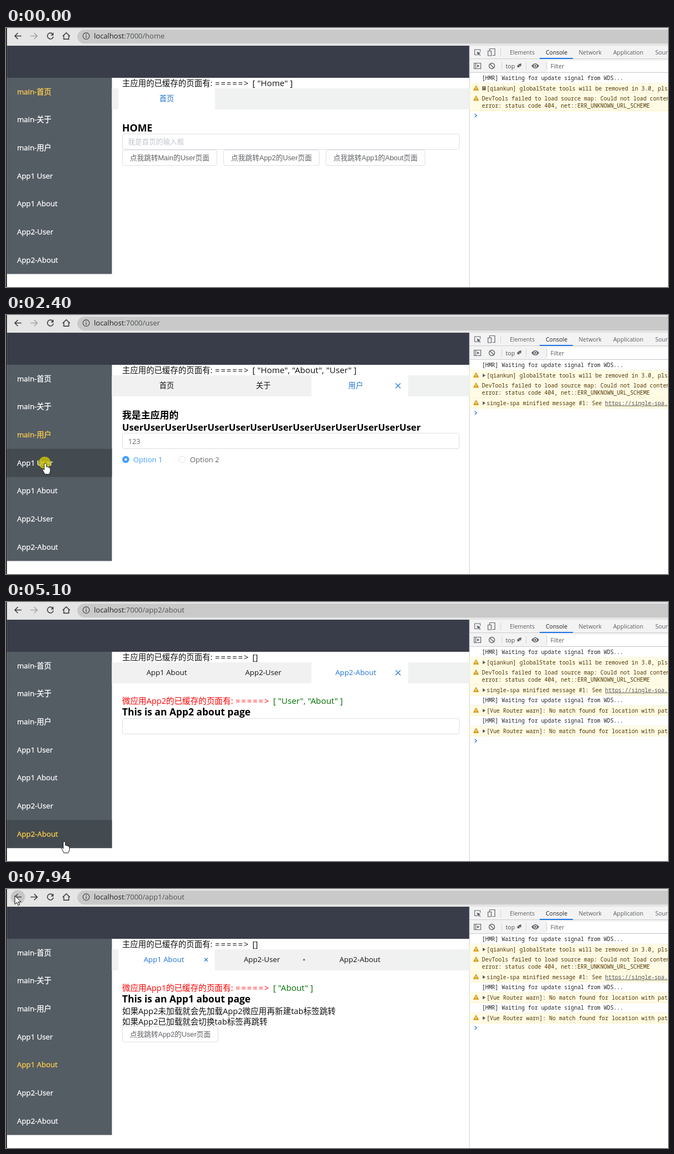
An HTML page that plays this animation: 1197x468 px, repeating every 8 s.

```html
<!DOCTYPE html>
<html lang="zh-CN">
<head>
<meta charset="utf-8">
<title>Micro app tabs</title>
<style>
html, body { margin: 0; width: 100%; height: 100%; overflow: hidden; background: #fff; }
svg { display: block; width: 1197px; height: 468px; font-family: 'Open Sans', 'Noto Sans CJK SC', 'Noto Sans CJK', sans-serif; }
.btn { font-family: 'Liberation Sans', 'Noto Sans CJK SC', 'Noto Sans CJK', sans-serif; }
.mono { font-family: 'Noto Sans Mono', monospace; }
</style>
</head>
<body>
<svg viewBox="0 0 1197 468"><g id="fixed"></g><g id="live"></g></svg>
<script>
const LOOP = 8000;
const MENU = ['main-首页', 'main-关于', 'main-用户', 'App1 User', 'App1 About', 'App2-User', 'App2-About'];
const BLUE = '#1c73d0';

// t: switch time, on: open page, show: when its content appears
const STATES = [
  { t: 0, url: 'home', on: 0, tabs: [0], list: ['Home'], show: -500 },
  { t: 1230, url: 'about', on: 1, tabs: [0, 1], list: ['Home', 'About'], show: 1380 },
  { t: 1880, url: 'user', on: 2, tabs: [0, 1, 2], list: ['Home', 'About', 'User'], show: 1930 },
  { t: 2650, url: 'app1/user', on: 3, tabs: [1, 2, 3], list: ['About', 'User'], app: 1, cache: ['User'], boot: 2760, show: 2980 },
  { t: 3370, url: 'app1/about', on: 4, tabs: [2, 3, 4], list: ['User'], app: 1, cache: ['User', 'About'], show: 3520 },
  { t: 3780, url: 'app2/user', on: 5, tabs: [3, 4, 5], list: [], app: 2, cache: ['User'], boot: 4150, show: 4560 },
  { t: 4870, url: 'app2/about', on: 6, tabs: [4, 5, 6], list: [], app: 2, cache: ['User', 'About'], show: 4940 },
  { t: 7100, url: 'app2/user', on: 5, tabs: [4, 5, 6], list: [], app: 2, cache: ['User', 'About'], show: 7180 },
  { t: 7740, url: 'app1/about', on: 4, tabs: [4, 5, 6], list: [], app: 1, cache: ['About'], show: 7740 }
];

// pointer path: time, x, y
const PATH = [
  [70, 1097, 460], [180, 1097, 460], [240, 800, 372], [320, 380, 250], [400, 22, 162], [540, 28, 158],
  [700, 35, 155], [1300, 35, 155], [1650, 48, 208], [1960, 50, 212], [2150, 70, 267], [2570, 70, 267],
  [2850, 74, 310], [3120, 75, 322], [3300, 76, 348], [3390, 77, 356], [3460, 77, 373], [3850, 77, 373],
  [4410, 85, 386], [4480, 105, 438], [4870, 105, 437], [5230, 104, 430], [5620, 686, 290],
  [6030, 53, 144], [6380, 30, 17], [6540, 30, 17], [6720, 16, 12]
];
const CLICKS = [[1010, 1130], [1720, 1860], [2400, 2570], [3130, 3230], [3620, 3740], [4720, 4860], [6870, 7020], [7710, 7800]];
const LOGS = [
  { t: 0, text: ['[HMR] Waiting for update signal from WDS...'] },
  { t: 0, warn: 1, more: 1, text: ['[qiankun] globalState tools will be removed in 3.0, pls'] },
  { t: 0, warn: 1, text: ['DevTools failed to load source map: Could not load content', 'error: status code 404, net::ERR_UNKNOWN_URL_SCHEME'] },
  { t: 1080, warn: 1, more: 1, text: ['single-spa minified message #1: See <tspan fill="#545454" text-decoration="underline">https://single-spa.js.org</tspan>'] },
  { t: 2740, text: ['[HMR] Waiting for update signal from WDS...'] },
  { t: 3770, warn: 1, more: 1, text: ['[Vue Router warn]: No match found for location with path'] },
  { t: 4150, text: ['[HMR] Waiting for update signal from WDS...'] },
  { t: 4790, warn: 1, more: 1, text: ['[Vue Router warn]: No match found for location with path'] }
];

const clamp = v => Math.max(0, Math.min(1, v));
const mix = (a, b, p) => `rgb(${a.map((v, i) => Math.round(v + (b[i] - v) * p))})`;
const text = (x, y, s, size, fill = '#111', more = '') => `<text x="${x}" y="${y}" font-size="${size}" fill="${fill}" ${more}>${s}</text>`;
const rect = (x, y, w, h, fill, more = '') => `<rect x="${x}" y="${y}" width="${w}" height="${h}" fill="${fill}" ${more}/>`;
const path = (d, stroke, w = 1, fill = 'none', more = '') => `<path d="${d}" stroke="${stroke}" stroke-width="${w}" fill="${fill}" ${more}/>`;
const dot = (x, y, r, fill, more = '') => `<circle cx="${x}" cy="${y}" r="${r}" fill="${fill}" ${more}/>`;
const frame = (x, y, w, h) => rect(x + .5, y + .5, w - 1, h - 1, '#fff', 'rx="3.5" stroke="#dcdfe6"');
const bold = (y, s, size) => text(210, y, s, size, '#000', 'font-weight="700"');
const input = y => frame(210, y, 610, 29);
const button = (x, y, w, s) => frame(x, y, w, 29) + text(x + 14, y + 19, s, 12.75, '#606266', 'class="btn"');
const names = list => list.length ? `[ ${list.map(n => `"${n}"`).join(', ')} ]` : '[]';
const arrows = (x, y, fill) => text(x, y, '=====&gt;', 14.65, fill, 'letter-spacing="2.05"');

function fixedParts() {
  const ink = '#45484c';
  let s = rect(0, 0, 1197, 32, '#e5e5e5') + rect(129, 3, 1100, 25, '#c9c9c9', 'rx="12.5"');
  s += path('M84.4 10.8A5.4 5.4 0 1 0 85.6 15.5', ink, 1.7) + path('M86 8v5.4h-5.4z', 'none', 0, ink);
  s += path('M102.5 14.8L109 8.6l6.5 6.2M104.5 13.5v6.7h9v-6.7', ink, 1.7);
  s += dot(145, 14.5, 5.8, 'none', 'stroke="#4a4d51" stroke-width="1.3"') + path('M145 13.5v4.2M145 10.8v1.5', '#4a4d51', 1.4);
  s += rect(0, 0, 1.5, 468, '#000') + rect(1.5, 32, 836.5, 58, '#393d49');
  s += rect(838, 32, 359, 49, '#f3f3f3') + rect(837.5, 32, 1, 436, '#cbcbcb');
  s += rect(838, 55, 359, 1, '#cacdd1') + rect(838, 80, 359, 1, '#cacdd1') + rect(965, 54, 60, 2, '#1a73e8');
  const tabs = { Elements: 911, Console: 976, Network: 1035.5, Application: 1098, Sources: 1174 };
  for (const n in tabs) s += text(tabs[n], 48, n, 10.45, n === 'Console' ? '#202124' : '#5a5d61');
  s += path('M852 48.5h-4.5v-9.5h10v4', '#5f6368', 1.1) + path('M851.5 42.5l6.7 2.7-2.7 1.2 2.7 2.8-1 1-2.8-2.8-1.2 2.5z', 'none', 0, '#5f6368');
  s += path('M874.5 41v-3.5h9.5v12h-4.5M871.5 41.5h6v8.5h-6z', '#5f6368', 1.2);
  s += path('M894.5 37v14M896.5 62v13M940.5 62v13M977.5 62v13', '#d0d3d6');
  s += path('M846.5 63.5h12v10h-12zM849.5 63.5v10', '#5f6368', 1.2) + path('M852 66v5l4-2.5z', 'none', 0, '#5f6368');
  s += dot(878.5, 68.5, 5, 'none', 'stroke="#5f6368" stroke-width="1.4"') + path('M875 65l7 7', '#5f6368', 1.4);
  s += text(903.5, 72.5, 'top', 10.6, '#4c4f53') + path('M926 65.5l6-1.5-1 6z', 'none', 0, '#5f6368') + rect(924.5, 67, 4, 4, '#5f6368');
  s += path('M950 68.5q7-9 14 0q-7 9-14 0z', 'none', 0, '#5f6368') + dot(957, 68.5, 3, '#f3f3f3') + dot(957, 68.5, 1.7, '#5f6368');
  s += rect(979, 59, 218, 20, '#fff') + text(984.5, 73, 'Filter', 10.6, '#55585c');
  return s;
}

function pointer(t) {
  if (t < PATH[0][0]) return null;
  const i = PATH.findIndex(k => k[0] > t);
  if (i < 0) return PATH[PATH.length - 1].slice(1);
  const a = PATH[i - 1], b = PATH[i], p = (t - a[0]) / (b[0] - a[0]);
  return [a[1] + (b[1] - a[1]) * p, a[2] + (b[2] - a[2]) * p];
}

const rowTop = i => 90 + i * 50.65;
const rowAt = p => p && p[0] < 191 && p[1] >= 90 && p[1] < 444 ? Math.floor((p[1] - 90) / 50.65) : -1;

function menu(t, cur, prev) {
  const N = 12, seen = Array(8).fill(0), ramp = clamp((t - cur.t) / 200);
  for (let k = 0; k < N; k++) {
    const r = rowAt(pointer(t - k * 200 / N));
    if (r >= 0) seen[r] += 1 / N;
  }
  let s = rect(1.5, 90, 190, 354.5, '#545c64');
  MENU.forEach((name, i) => {
    const lit = cur.on === i ? (prev ? ramp : 1) : prev && prev.on === i ? 1 - ramp : 0;
    const color = mix([255, 255, 255], [255, 208, 75], lit);
    if (seen[i]) s += rect(1.5, rowTop(i), 190, 50.65, '#434a50', `opacity="${seen[i].toFixed(2)}"`);
    s += text(20, (rowTop(i) + 29.6).toFixed(1), name, 13.3, color, `stroke="${color}" stroke-width=".3"`);
  });
  return s;
}

function tabBar(cur, prev, ramp) {
  let s = rect(191.5, 109, 646, 38, '#f0f2f1');
  cur.tabs.forEach((id, i) => {
    const on = cur.on === id, mid = 290.5 + i * 174.7;
    let p = 0;
    if (id > 0 && on) p = prev && prev.tabs.includes(id) ? ramp : 1;
    else if (id > 0 && prev && prev.on === id && prev.tabs[i] === id) p = 1 - ramp;
    s += rect(203 + i * 174.7, 109, 174.7, 38, on ? '#fff' : '#f1f1f1');
    s += text((mid - 7.5 * p).toFixed(1), 132, MENU[id].replace('main-', ''), 13.3, on ? BLUE : '#111', 'text-anchor="middle"');
    if (p > .02) {
      const x = mid + 76 - 7 * p, r = 4.4 * p;
      s += path(`M${x - r} ${127.8 - r}l${2 * r} ${2 * r}m0 ${-2 * r}l${-2 * r} ${2 * r}`, on ? BLUE : '#666', 1.3);
    }
  });
  return s;
}

function page(cur) {
  const about = n => bold(205, `This is an ${n} page`, 17.5);
  switch (cur.on) {
    case 0: return bold(186.5, 'HOME', 17.9) + input(191) + text(220.5, 210, '我是首页的输入框', 12.7, '#c0c4cc') +
      button(210, 220, 172, '点我跳转Main的User页面') + button(393, 220, 174, '点我跳转App2的User页面') + button(578, 220, 180, '点我跳转App1的About页面');
    case 1: return bold(187, 'This is an about page', 17.5) + input(191);
    case 2: return bold(187, '我是主应用的', 17) + bold(208.5, 'User'.repeat(14), 16.8) + input(213) + text(221, 232.5, '123', 12.7, '#606266') +
      dot(216.5, 261, 6.3, '#409eff') + dot(216.5, 261, 2.2, '#fff') + text(230, 266, 'Option 1', 13.1, '#409eff') +
      dot(318.5, 261, 6, '#fff', 'stroke="#dcdfe6"') + text(332.5, 266, 'Option 2', 13.1, '#606266');
    case 3: return about('App1 user');
    case 4: return about('App1 about') + text(210, 225.5, '如果App2未加载就会先加载App2微应用再新建tab标签跳转', 14.65) +
      text(210, 244.5, '如果App2已加载就会切换tab标签再跳转', 14.65) + button(210, 248, 174, '点我跳转App2的User页面');
    case 5: return about('App2 user');
    default: return about('App2 about') + input(210);
  }
}

function consolePane(t) {
  const blocky = t < 1080 || (t >= 2740 && t < 3770);
  let y = 81, s = '';
  for (const l of LOGS) {
    if (t < l.t) break;
    const h = l.text.length > 1 ? 31.5 : 18.5;
    if (l.warn) {
      s += rect(838.5, y, 359, h, '#fffbe5');
      s += path(`M850 ${y + 4.5}l4.5 8.5h-9z`, '#d99a16', 1, '#d99a16', 'stroke-linejoin="round"') + path(`M850 ${y + 7.5}v3M850 ${y + 11.3}v1.3`, '#fff', 1.2);
    }
    s += rect(838.5, y + h - .5, 359, 1, l.warn ? '#fff0b8' : '#f0f0f0');
    if (l.more) s += blocky ? rect(861, y + 6, 6.5, 7, '#6b604a') + path(`M862.5 ${y + 8}h3.5M862.5 ${y + 10.5}h2`, '#fffbe5', .8)
      : path(`M862 ${y + 6.5}v6.5l5-3.25z`, 'none', 0, '#5e5a50');
    l.text.forEach((line, i) => s += text(l.more ? 869 : 860.5, y + 13.2 + i * 12.5, line, 9.93, l.warn ? '#523600' : '#262626', 'class="mono"'));
    y += h;
  }
  return s + path(`M847.5 ${y + 5.8}l3.5 3-3.5 3`, '#367cf1', 1.5);
}

function cursor(t) {
  const p = pointer(t);
  if (!p) return '';
  const [x, y] = p;
  let s = CLICKS.some(c => t >= c[0] && t < c[1]) ? dot(x, y, 11, '#d8cf00', 'opacity=".75"') : '';
  const shape = rowAt(p) >= 0
    ? 'M-1 1.8Q1-1 3 1.8V7.5Q4.5 6 5.7 8Q7.4 7 8.2 9Q10.2 8.5 10.2 11V15Q10 18 8 20.8H.2Q-1.5 17-3.6 13.8Q-5 11.3-3 11Q-2 11-1 13Z'
    : 'M0 0V15.5L3.6 12.2L6.2 17.6L8.6 16.5L6.1 11.3H11Z';
  return s + `<g transform="translate(${x.toFixed(1)} ${y.toFixed(1)})">${path(shape, '#111', 1, '#fff', 'stroke-linejoin="round"')}</g>`;
}

function scene(t) {
  let n = STATES.length - 1;
  while (STATES[n].t > t) n--;
  const cur = STATES[n], prev = STATES[n - 1], ramp = clamp((t - cur.t) / 300);
  const p = pointer(t);
  let s = p && p[0] < 26 && p[1] < 28 ? dot(21.5, 14.5, 12.7, '#c6c6c6') : '';
  s += path('M28 14.5H16.5M21.5 9l-5.5 5.5 5.5 5.5', '#3c4043', 1.7);
  s += path('M44.5 14.5H56M51 9l5.5 5.5-5.5 5.5', n >= 7 ? '#3c4043' : '#a3a5a8', 1.7);
  s += text(159, 19, `<tspan fill="#202124">localhost</tspan>:7000/${cur.url}`, 13.03, '#505357');
  s += menu(t, cur, prev);
  s += text(210, 105, '主应用的已缓存的页面有:', 14.5) + arrows(378, 105, '#111') + text(445.5, 105, names(cur.list), 15.2);
  s += tabBar(cur, prev, ramp);
  if (cur.app && t >= (cur.boot || 0)) {
    s += text(210, 184, `微应用App${cur.app}的已缓存的页面有:`, 14.65, '#f00') + arrows(415, 184, '#f00') + text(483, 184, names(cur.cache), 15.25, '#007000');
  }
  const shown = clamp((t - cur.show) / 150);
  if (shown) s += `<g opacity="${shown.toFixed(2)}">${page(cur)}</g>`;
  return s + consolePane(t) + cursor(t);
}

const live = document.getElementById('live');
document.getElementById('fixed').innerHTML = fixedParts();
const start = performance.now();
let last = '';
function tick() {
  const s = scene((performance.now() - start) % LOOP);
  if (s !== last) live.innerHTML = last = s;
  requestAnimationFrame(tick);
}
tick();
</script>
</body>
</html>
```
